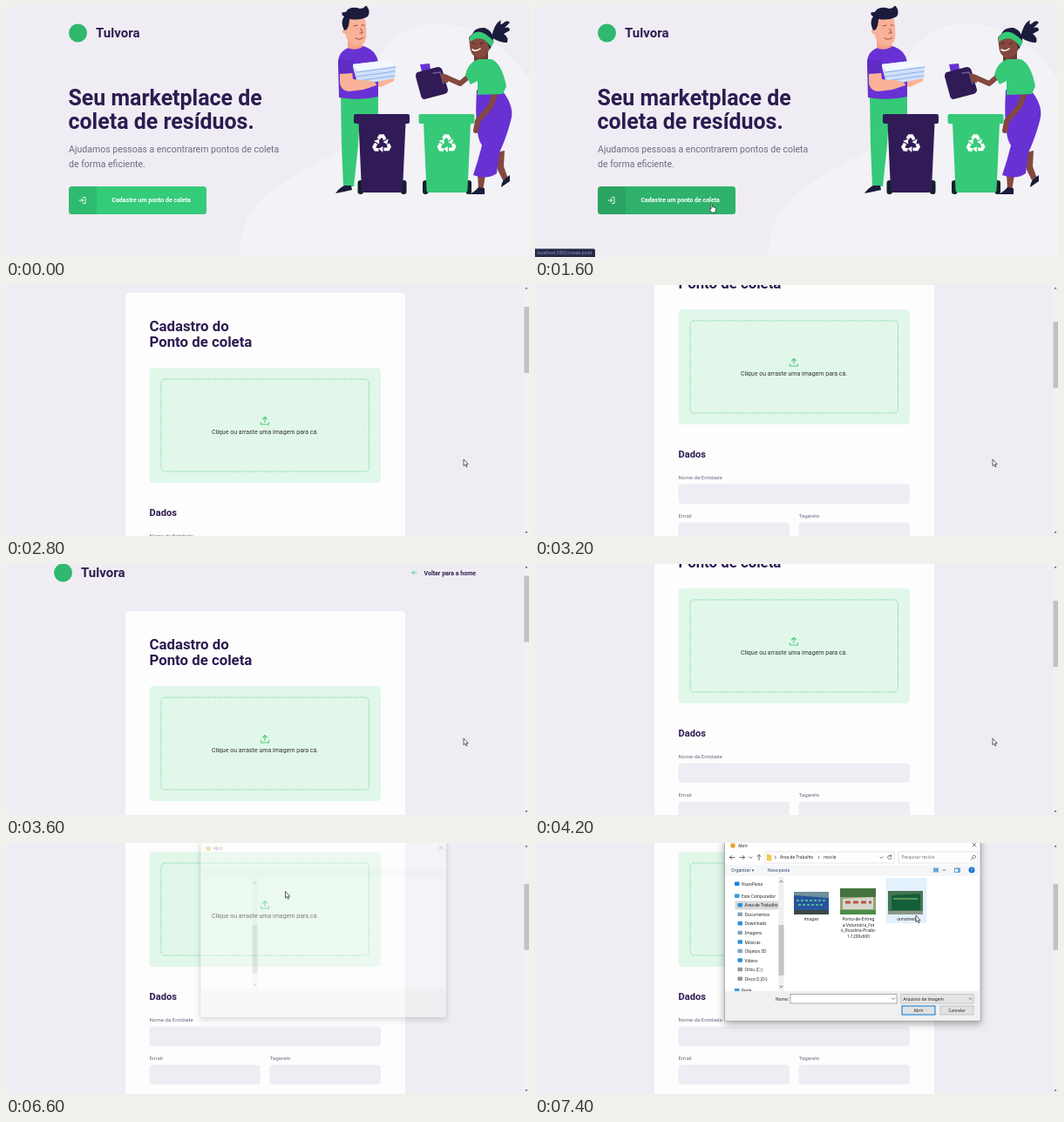
Animation of 600x288 px, one loop 8 s. Source, as an HTML page:

```html
<!DOCTYPE html>
<html lang="pt-BR">
<head>
<meta charset="utf-8">
<title>Cadastro de ponto de coleta</title>
<style>
  html, body { margin: 0; width: 100%; height: 100%; overflow: hidden; background: #efedf3; }
  svg { display: block; width: 100vw; height: 100vh; }
  text { font-family: Roboto, sans-serif; white-space: pre; }
  .title { font-weight: 700; fill: #2d1b50; }
  .bold { font-weight: 700; font-size: 7px; }
  .label { font-size: 6.15px; fill: #6c6c80; }
  .win text { font-family: "Noto Sans", sans-serif; font-size: 4.8px; fill: #222; }
  .win .blue { fill: #1e3b66; }
  .mid { text-anchor: middle; }
  .line { fill: none; stroke-linecap: round; stroke-linejoin: round; }
  #dialog { transform-origin: 364px 97px; }
  #frame { filter: drop-shadow(0 3px 4px rgba(0, 0, 0, .35)); }
</style>
</head>
<body>
<svg viewBox="0 0 600 288" preserveAspectRatio="none">
  <defs>
    <g id="brand">
      <circle cx="10.5" cy="31" r="10.5" fill="#2fb86e"/>
      <text class="title" x="31" y="36" font-size="15">Tulvora</text>
    </g>
    <g id="bend">
      <path d="M-3.6-5.8-1.6-8.6H1.4L3.6-4.8" fill="none" stroke="#fff" stroke-width="3.6"/>
      <path d="M1.4-2.3 7.2-5.5 5.9.3Z" fill="#fff"/>
    </g>
    <g id="recycle">
      <use href="#bend"/>
      <use href="#bend" transform="rotate(120)"/>
      <use href="#bend" transform="rotate(240)"/>
    </g>
    <g id="bin">
      <rect x="4.5" y="77" width="6.500" height="16" rx="3" fill="#14202a"/>
      <rect x="54" y="77" width="6.500" height="16" rx="3" fill="#14202a"/>
      <path d="M5.500 11H59.500L56 88Q56 91 53 91H12Q9 91 9 88Z"/>
      <path d="M2 1H62Q64 1 64 3V10Q64 12 62 12H2Q0 12 0 10V3Q0 1 2 1Z"/>
      <use href="#recycle" transform="translate(32 35.500) scale(1.07)"/>
    </g>
  </defs>

  <rect width="600" height="288" fill="#efedf3"/>

  <g id="home">
    <path d="M268 288Q266 245 300 215 335 190 378 168 405 150 415 95 430 22 495 20 560 22 600 85V288Z" fill="#f3f2f6"/>
    <use href="#brand" x="72"/>
    <g class="title" font-size="24.95">
      <text x="71.500" y="114">Seu marketplace de</text>
      <text x="71.500" y="141">coleta de resíduos.</text>
    </g>
    <g font-size="10.55" fill="#6c6c80">
      <text x="72" y="168">Ajudamos pessoas a encontrarem pontos de coleta</text>
      <text x="72" y="185">de forma eficiente.</text>
    </g>
    <rect id="button" x="72" y="207" width="158" height="32" rx="3.500"/>
    <path d="M75.500 207H104V239H75.500Q72 239 72 235.500V210.500Q72 207 75.500 207Z" opacity=".08"/>
    <path class="line" d="M88.500 219.500H91V226.500H88.500M84 223H88.500M86.800 221 88.700 223 86.800 225" stroke="#fff" stroke-width=".9"/>
    <text class="bold" x="121.500" y="225.400" fill="#fff">Cadastre um ponto de coleta</text>

    <!-- man -->
    <path d="M384 102H427V126H406L404 160 399 207H387L385 160Z" fill="#35c978"/>
    <path d="M378 215Q382 209 388 206H396L397 211 388 213Z" fill="#1b1b3c"/>
    <path d="M422 78 439 77Q447 79 445 86L430 93 420 90Z" fill="#f9b297"/>
    <path d="M382 105 381 66Q381 52 393 48L410 46Q424 50 427 64V104Q404 109 382 105Z" fill="#6831d3"/>
    <path d="M392 36H409V47Q400 52 392 48Z" fill="#f3a389"/>
    <path d="M389 17Q400 10 412 15 414 28 413 37 411 46 402 46 391 44 389 30Z" fill="#f9b297"/>
    <circle cx="389" cy="29" r="3" fill="#f9b297"/>
    <path d="M388 28Q383 18 388 12 384 10 386 7 390 8 392 4 398 0 406 3 411 3 413-1 419 6 415 12 407 17 394 15 394 22 391 27Z" fill="#1b1b3c"/>
    <path class="line" d="M399 23 403 22M408 22 411 22M401 37Q406 40 410 36M407 26 409 31H406" stroke="#8c3f39" stroke-width=".9"/>
    <path d="M397 67 439 62 447 69 446 83 404 91Z" fill="#cfe1fa"/>
    <path d="M397 67 439 62 447 69 403 75Z" fill="#f2f8fe"/>
    <path class="line" d="M402 76 447 70M402 81 446 75M403 86 446 80" stroke="#90b0ea" stroke-width="1.200"/>
    <path d="M383 75H397L398 84 418 86Q425 87 425 91L410 96 393 98Q384 97 383 88Z" fill="#f9b297"/>
    <path d="M381 62 398 62 398 77 382 78Z" fill="#5f2cc4"/>

    <!-- woman -->
    <path d="M562 168 572 166 571 184 577 201 572 204 564 188ZM541 192 550 194 547 212 542 211Z" fill="#84483f"/>
    <path d="M568 208Q568 200 578 194L578 201ZM531 216Q537 214 542 208L549 209 549 216Z" fill="#1b1b3c"/>
    <path d="M540 96 570 98Q584 116 579 132 573 154 566 168L563 192Q552 200 536 194 542 176 546 160 537 148 540 96Z" fill="#6831d3"/>
    <path d="M537 50H553V64H537Z" fill="#713a34"/>
    <path d="M531 36Q539 26 553 32L556 46Q552 59 542 60 532 57 532 45Z" fill="#84483f"/>
    <path d="M534 36Q536 24 549 25 560 29 559 42L555 50 552 40 543 34Z" fill="#1b1b3c"/>
    <path d="M557 36Q560 20 568 16 566 23 570 20 575 15 578 19L572 25Q578 23 578 28L571 32Q577 36 575 42 566 42 557 36Z" fill="#1b1b3c"/>
    <path d="M532 36Q542 21 560 41L556 47Q547 31 532 41Z" fill="#35c978"/>
    <path class="line" d="M535 50Q539 53 544 49" stroke="#fff" stroke-width="1.600"/>
    <path class="line" d="M535 43Q536 42 538 43M544 43Q546 42 547 43" stroke="#241a2c" stroke-width=".8"/>
    <path class="line" d="M533 79 521 89 503 81" stroke="#84483f" stroke-width="6"/>
    <path class="line" d="M563 96 556 115 541 132 539 143" stroke="#84483f" stroke-width="6"/>
    <path d="M527 79Q530 65 542 61H557Q569 66 574 92L570 101 541 102 541 86 533 90Z" fill="#35c978"/>
    <path d="M475 67 486 66 487 73 477 76Z" fill="#6831d3"/>
    <path d="M472 76 495 70Q500 70 501 75L507 96Q507 100 503 101L480 107Q477 107 476 103L470 81Q470 77 472 76Z" fill="#301b56"/>
    <path class="line" d="M490 77 498 76 502 89" stroke="#6d5f92" stroke-width="1.500"/>
    <path d="M498 77 507 80 507 88 501 87Z" fill="#84483f"/>

    <use href="#bin" x="399" y="123" fill="#301b56"/>
    <use href="#bin" x="473.5" y="123" fill="#35c978"/>

    <g id="status">
      <path d="M0 278.500H67Q69 278.500 69 280.500V288H0Z" fill="#272a49"/>
      <text x="2.500" y="285.300" font-size="5.100" fill="#8794c4">localhost:3000/create-point</text>
    </g>
  </g>

  <g id="form">
    <g id="page">
      <use href="#brand" x="55"/>
      <path class="line" d="M471 31H466M468 29 466 31 468 33" stroke="#34cb79" stroke-width=".8"/>
      <text class="bold" x="479.500" y="33.500" fill="#322153">Voltar para a home</text>
      <rect x="137" y="75" width="321" height="800" rx="4" fill="#fefdfe"/>
      <g class="title" font-size="16.800">
        <text x="164.500" y="118.500">Cadastro do</text>
        <text x="164.500" y="137">Ponto de coleta</text>
      </g>
      <rect x="164.500" y="161" width="265.500" height="132" rx="4.500" fill="#e1f7ea"/>
      <rect x="178" y="174" width="238.500" height="106" rx="4.500" fill="none" stroke="#4ecb79" stroke-width=".8" stroke-dasharray="1.300 1.300"/>
      <path class="line" d="M292.500 223.500V226H301.500V223.500M297 223.500V217.500M294.500 220 297 217.500 299.500 220" stroke="#4ecb79" stroke-width="1.100"/>
      <text class="mid" x="297" y="236.700" font-size="7.030" fill="#333">Clique ou arraste uma imagem para cá.</text>
      <text class="title" x="164.500" y="331" font-size="11.100">Dados</text>
      <g class="label">
        <text x="164.500" y="356.300">Nome da Entidade</text>
        <text x="164.500" y="400.300">Email</text>
        <text x="302.500" y="400.300">Tagarelo</text>
      </g>
      <g fill="#efedf3">
        <rect x="164.500" y="361.500" width="265.500" height="22.500" rx="3.500"/>
        <rect x="164.500" y="405.500" width="127.500" height="22.500" rx="3.500"/>
        <rect x="302.500" y="405.500" width="127.500" height="22.500" rx="3.500"/>
      </g>
    </g>
    <rect x="594" width="6" height="288" fill="#f1f1f1"/>
    <rect id="thumb" x="594.500" width="5.500" height="76" fill="#c1c1c1"/>
    <path d="M595.500 4.500 597 2.500 598.500 4.500ZM595.500 283 597 285 598.500 283Z" fill="#555"/>
  </g>

  <g id="dialog" class="win">
    <rect id="frame" x="217.500" y="-6" width="293.500" height="210" fill="#fff" stroke="#8b8b8b" stroke-width=".6"/>
    <circle cx="227" cy="3" r="2.800" fill="#e2a52c"/>
    <text x="233" y="4.500">Abrir</text>
    <path class="line" d="M502 0 506 4M506 0 502 4" stroke="#333" stroke-width=".6"/>
    <path d="M218 25H510.500V38H218Z" fill="#f5f6f7"/>
    <path d="M218 170H510.500V203.500H218Z" fill="#f0f0f0"/>
    <path d="M279.500 39H285.500V170H279.500Z" fill="#f0f0f0"/>
    <path d="M279.500 94H285.500V152H279.500Z" fill="#c4c4c4"/>
    <path class="line" d="M281 45 282.500 43 284 45M281 164 282.500 166 284 164" stroke="#555" stroke-width=".8"/>
    <g id="content">
      <path class="line" d="M229 16.500H223.500M225.500 14.500 223.500 16.500 225.500 18.500M235 16.500H240.500M238.500 14.500 240.500 16.500 238.500 18.500M246 16 247.500 17.500 249 16M257 19.500V13.500M255 15.500 257 13.500 259 15.500" stroke="#444" stroke-width=".8"/>
      <g fill="#fff" stroke="#d2d2d2" stroke-width=".6">
        <rect x="264" y="10" width="148" height="13"/>
        <rect x="417" y="10" width="91" height="13"/>
      </g>
      <path d="M266 13H269L270 14H271.500V20.500H266Z" fill="#f2c94c"/>
      <path class="line" d="M275 15 276.500 16.500 275 18M325 15 326.500 16.500 325 18M396 16 397.500 17.500 399 16M408.500 15A2.200 2.200 0 1 0 409 17M408.700 13.500V15.200H407" stroke="#444" stroke-width=".7"/>
      <text x="281" y="18.300">Área de Trabalho</text>
      <text x="331" y="18.300">recicle</text>
      <text x="420.500" y="18.300" style="fill:#707070">Pesquisar recicle</text>
      <path class="line" d="M500 19 502 17M505.500 15.500A1.800 1.800 0 1 1 505.400 15.200" stroke="#555" stroke-width=".7"/>
      <text class="blue" x="225" y="33.200">Organizar ▾</text>
      <text class="blue" x="267" y="33.200">Nova pasta</text>
      <path d="M457 28.500H463V33.500H457ZM481 28.500H488V34H481Z" fill="#6ba6d8"/>
      <path d="M482 30H485V33H482Z" fill="#fff"/>
      <path class="line" d="M468 30.500 469.500 32 471 30.500" stroke="#444" stroke-width=".7"/>
      <circle cx="501" cy="31" r="3.500" fill="#1b78cf"/>
      <text class="mid" x="501" y="32.800" style="fill:#fff">?</text>
      <rect x="229.500" y="66.500" width="50" height="10" fill="#d9d9d9"/>
      <g id="side"></g>
      <rect id="hover" y="40" width="47" height="52" fill="#e2f1fc"/>
      <g>
        <path d="M297 56H337V82H297Z" fill="#6f8f9b"/>
        <path d="M297 60 337 63V77H297Z" fill="#27549b"/>
        <path d="M300 66H334M302 71H332" stroke="#4fb59b" stroke-width="2" stroke-dasharray="3 2"/>
        <path d="M297 77H337V82H297Z" fill="#3d4744"/>
        <path d="M350 52H391V82H350Z" fill="#91a573"/>
        <path d="M350 52H391V62H350Z" fill="#44733e"/>
        <path d="M353 64 388 62V76H353Z" fill="#d5d7cd"/>
        <path d="M356 68H386" stroke="#bc5149" stroke-width="3" stroke-dasharray="6 3"/>
        <path d="M350 77H391V82H350Z" fill="#4b8b49"/>
        <path d="M405 55H445V82H405Z" fill="#487451"/>
        <path d="M409 60 442 58V77H409Z" fill="#14603a"/>
        <path d="M411 64H439" stroke="#73a663" stroke-width="1.500"/>
        <path d="M405 78H445V82H405Z" fill="#8d958a"/>
      </g>
      <g class="mid">
        <text x="317" y="89">images</text>
        <text x="371" y="89">Ponto-de-Entreg</text>
        <text x="371" y="95.600">a-Voluntária_Fot</text>
        <text x="371" y="102.200">o_Rosalina-Prado-</text>
        <text x="371" y="108.800">1-1200x900</text>
        <text x="426" y="89">unnamed</text>
      </g>
      <text x="291" y="180.500" text-anchor="end">Nome:</text>
      <rect x="293" y="173.500" width="122" height="10.500" fill="#fff" stroke="#7a7a7a" stroke-width=".6"/>
      <rect x="420" y="173.500" width="83" height="10.500" fill="#e5e5e5" stroke="#adadad" stroke-width=".6"/>
      <path class="line" d="M409.500 178 411 179.500 412.500 178M498 178 499.500 179.500 501 178" stroke="#444" stroke-width=".7"/>
      <text x="422.500" y="180.500">Arquivos de imagem</text>
      <rect x="421" y="187" width="38" height="10" fill="#e1e1e1" stroke="#0078d7"/>
      <rect x="465" y="187" width="38" height="10" fill="#e1e1e1" stroke="#adadad" stroke-width=".6"/>
      <text class="mid" x="440" y="193.800">Abrir</text>
      <text class="mid" x="484" y="193.800">Cancelar</text>
    </g>
  </g>

  <g id="cursor" fill="#fff" stroke="#222" stroke-width=".7" stroke-linejoin="round">
    <path id="arrow" d="M0 0V7.500L1.700 6 2.900 8.700 4.100 8.200 3 5.600H5.200Z"/>
    <path id="hand" d="M0 0Q.9-.9 1.500.3V3.500L5 4.300Q6 4.700 5.600 7L4.600 10H.7L-2 6.200Q-1.500 5 0 6.200Z"/>
  </g>
</svg>
<script>
const LOOP = 8000, TICK = 200;
const $ = id => document.getElementById(id);
const show = (id, on) => $(id).style.display = on ? "" : "none";

// Sidebar: label, baseline, indent, icon colour
const side = $("side");
function entry(label, y, x, color) {
  side.insertAdjacentHTML("beforeend",
    `<rect x="${x - 8}" y="${y - 4.3}" width="5.500" height="4.500" rx=".8" fill="${color}"/>` +
    `<text x="${x}" y="${y}">${label}</text>`);
}
entry("NuvoPasta", 48.800, 237, "#1784d8");
entry("Este Computador", 62.800, 237, "#3c9bd9");
["Área de Trabalho", "Documentos", "Downloads", "Imagens", "Músicas", "Objetos 3D", "Vídeos", "Orbu (C:)", "Disco D (D:)"]
  .forEach((name, i) => entry(name, 73.300 + i * 10.550, 240.500, i > 6 ? "#8b949c" : i % 2 ? "#7fa6c4" : "#2c91da"));
side.insertAdjacentHTML("beforeend", '<svg x="218" y="163" width="60" height="7" viewBox="218 163 60 7"><text x="237" y="171">Rede</text><rect x="229" y="167" width="5.500" height="5" fill="#3c9bd9"/></svg>');

// Pointer: time, x, y
const pointer = [
  [400, 224, 155], [600, 221, 170], [800, 216, 188], [1000, 211, 208], [1200, 206, 220], [1400, 202, 227],
  [2000, 230, 225], [2200, 410, 212], [2400, 525, 200],
  [4800, 420, 128], [5000, 320.500, 55.500],
  [6800, 340, 61], [7000, 378, 71], [7200, 418, 79], [7400, 437, 83]
];
// Page scroll: time, offset
const scroll = [[0, 0], [2800, 66], [3000, 118], [3200, 133], [3400, 74], [3600, 21], [4000, 76], [4200, 133], [4400, 151]];
const at = (steps, t) => steps.filter(s => s[0] <= t).pop();
const columns = [317, 371, 426];

function draw(t) {
  const [, x, y] = at(pointer, t) || [0, -20, -20];
  const home = t < 2000, open = t >= 6800;
  const over = home && x > 72 && x < 230 && y > 207 && y < 239;

  show("home", home);
  show("form", !home);
  show("status", t >= 1600);
  $("button").setAttribute("fill", over ? "#2fb26b" : "#34cb79");

  const top = at(scroll, t)[1];
  $("page").setAttribute("transform", `translate(0 ${-top})`);
  $("thumb").setAttribute("y", 8 + top * .257);

  show("dialog", t >= 6600);
  show("content", open);
  $("dialog").style.opacity = open ? 1 : .36;
  $("dialog").style.transform = open ? "none" : "scale(.963)";
  const file = columns.find(c => Math.abs(x - c) < 23.5);
  show("hover", file);
  if (file) $("hover").setAttribute("x", file - 23.5);

  $("cursor").setAttribute("transform", `translate(${x} ${y})`);
  show("arrow", !over);
  show("hand", over);
}

const start = performance.now();
let last = -1;
function loop() {
  const t = Math.floor((performance.now() - start) % LOOP / TICK) * TICK;
  if (t !== last) draw(last = t);
  requestAnimationFrame(loop);
}
loop();
</script>
</body>
</html>
```
